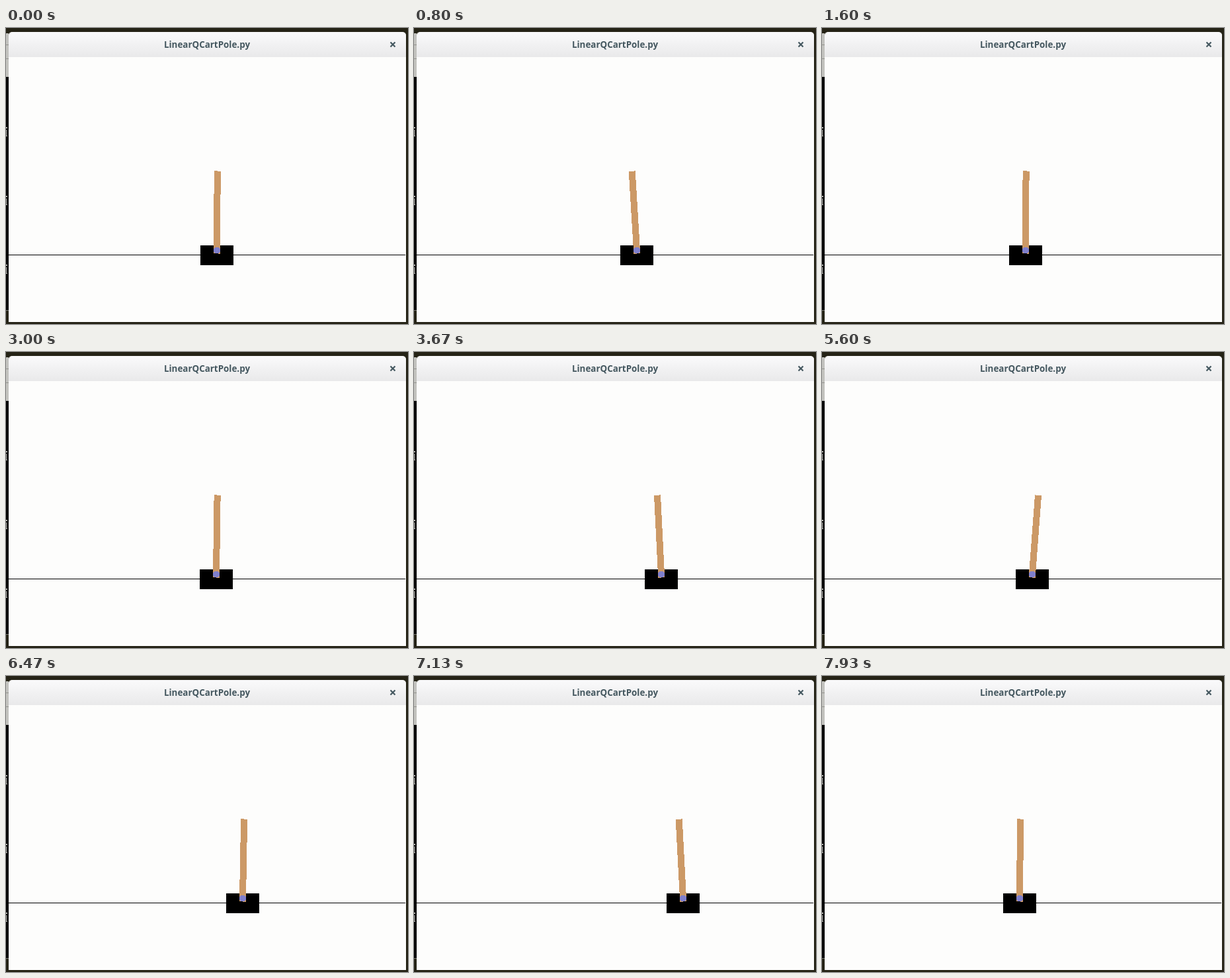
Write an HTML page that moves like this. It is 608 px wide and 448 px high and loops after 8000 ms.

```html
<!DOCTYPE html>
<html lang="en">
<head>
<meta charset="utf-8">
<title>Cart pole</title>
<style>
html, body { margin: 0; width: 100%; height: 100%; overflow: hidden; background: #252316; }
svg { display: block; width: 608px; height: 448px; }
text { font: 700 13.4px "Open Sans", "Noto Sans", sans-serif; fill: #455860; text-anchor: middle; }
.crisp { shape-rendering: crispEdges; }
</style>
</head>
<body>
<svg viewBox="0 0 608 448">
  <defs>
    <linearGradient id="bar" x1="0" y1="0" x2="0" y2="1">
      <stop offset="0" stop-color="#fafafb"/>
      <stop offset="1" stop-color="#e9e9ea"/>
    </linearGradient>
    <path id="glyph" d="M0 0h2v2h-2zM0 4h1v9h-1zM0 13h2v1h-2z" fill="#b4b4b0"/>
  </defs>
  <rect width="608" height="448" fill="#252316"/>
  <g class="crisp">
    <rect y="8" width="4" height="66" fill="#c2c2be"/>
    <path d="M0 25.5h4M0 46.5h4" stroke="#93938e"/>
    <rect y="74" width="4" height="354" fill="#000"/>
    <path d="M0 427.5h4" stroke="#777770"/>
    <use href="#glyph" y="150"/>
    <use href="#glyph" y="254"/>
    <use href="#glyph" y="358"/>
  </g>
  <path d="M4 445V12q0-6 6-6H599q6 0 6 6V445z" fill="#fdfdfc"/>
  <path d="M4 44V12q0-6 6-6H599q6 0 6 6V44z" fill="url(#bar)"/>
  <text x="304" y="30">LinearQCartPole.py</text>
  <path d="M581.5 21.5l7 7m0-7l-7 7" stroke="#455860" stroke-width="2.2"/>
  <path class="crisp" d="M4 343.5H604" stroke="#000"/>
  <g id="cart" class="crisp">
    <rect x="-25" y="329" width="50" height="30"/>
    <rect id="pole" x="-5" y="216.5" width="10" height="125" fill="#cc9966"/>
    <circle cy="336.5" r="5" fill="#7f7fcc"/>
  </g>
</svg>
<script>
const LOOP = 8000;
const TICK = 200 / 3;

// Turning points of the swing: time, cart x, pole degrees. Each run starts with a reset.
const turn = (time, x, lean) => ({ time, x, lean });
const runs = [
  { from: 0, turns: [turn(-830, 301, 4.2), turn(830, 337, -3.5), turn(2150, 291, 2.5)] },
  { from: 1670, turns: [turn(1670, 299, .3), turn(2250, 282, 3.1), turn(4200, 393, -4.1),
    turn(5700, 317, 4.4), turn(7400, 413, -3.5), turn(8700, 320, 4)] },
  { from: 7870, turns: [turn(7870, 297, .3), turn(LOOP, 301, .8)] }
];

const cart = document.getElementById("cart");
const pole = document.getElementById("pole");
const mix = (a, b, u) => a + (b - a) * u;
const ease = u => (1 - Math.cos(Math.PI * u)) / 2;

// Pictures change every 70, 60 and 70 ms in turn.
function snap(t) {
  const start = n => Math.round(n * TICK / 10) * 10;
  let n = Math.floor(t / TICK) + 1;
  while (start(n) > t) n--;
  return start(n);
}

function draw(now) {
  const t = snap(now % LOOP);
  const { turns } = runs.findLast(run => run.from <= t);
  const next = turns.findIndex(p => p.time > t);
  const a = turns[next - 1], b = turns[next];
  const u = ease((t - a.time) / (b.time - a.time));
  cart.setAttribute("transform", `translate(${Math.round(mix(a.x, b.x, u))} 0)`);
  pole.setAttribute("transform", `rotate(${mix(a.lean, b.lean, u).toFixed(2)} 0 336.5)`);
}

const begin = performance.now();
function loop() {
  // Clock readings can precede a tick by a fraction of a millisecond.
  draw(Math.max(0, performance.now() - begin));
  requestAnimationFrame(loop);
}
loop();
</script>
</body>
</html>
```
